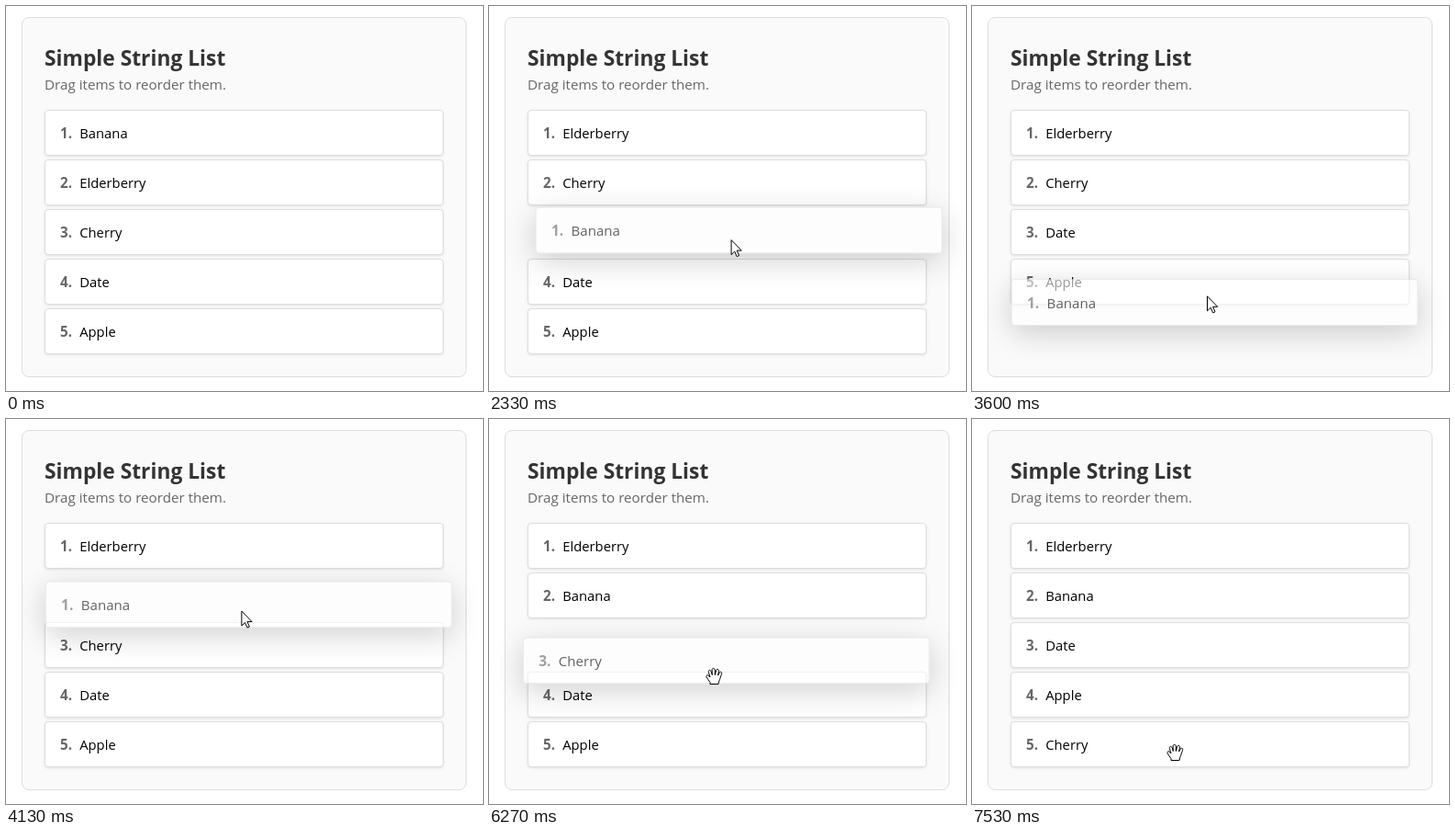
Write an HTML page that moves like this. It is 520 px wide and 419 px high and loops after 8 s.

```html
<!DOCTYPE html>
<html lang="en">
<head>
<meta charset="utf-8">
<title>Simple String List</title>
<style>
  html, body { margin: 0; width: 100%; height: 100%; overflow: hidden; background: #fff; }
  body { position: relative; font: 15.2px/20px "Open Sans", "Noto Sans", sans-serif; }
  .card, .row, h1, p, .row *, .cursor { position: absolute; box-sizing: border-box; margin: 0; white-space: nowrap; }
  .card { left: 17px; top: 12px; width: 485px; height: 392px; background: #fafafa; border: 1px solid #ddd; border-radius: 8px; }
  h1 { left: 42px; top: 42px; font-size: 22.8px; line-height: 30px; font-weight: 700; color: #333; }
  p { left: 42px; top: 75px; color: #666; }
  .row { left: 42px; top: 113px; width: 435px; height: 50px; font-size: 14.8px; line-height: 48px; background: #fff; color: #000;
    border: 1px solid #ddd; border-radius: 4px; box-shadow: 0 1px 3px rgba(0,0,0,.1); }
  .row b { left: 16px; font-size: 15.2px; color: #666; }
  .row span { left: 37.2px; }
  .row.drag { z-index: 1; opacity: .6; box-shadow: 0 8px 32px rgba(0,0,0,.3); }
  .cursor { left: 0; top: 0; z-index: 2; overflow: visible; }
  .cursor path { fill: #fff; stroke: #000; stroke-linejoin: round; }
</style>
</head>
<body>
<div class="card"></div>
<h1>Simple String List</h1>
<p>Drag items to reorder them.</p>
<svg class="cursor" width="1" height="1">
  <path id="arrow" d="M.5 .5V16.5L4.2 13L6.6 18.5L9 17.5L6.6 12H11.7Z"/>
  <path id="hand" d="M-4 8.5V6.5C-5.5 4.5-7 2.5-8 .5C-8.5-1-6.5-2-5.2-.5L-4 1L-5.6-4.5C-6.2-6.8-3.6-7.4-2.9-5.3L-1.7-1.5L-1.9-7C-1.9-9.2 1.2-9.2 1.3-7L1.4-1.5L2.7-6.5C3.3-8.5 6-7.8 5.6-5.7L4.6-1L6.2-3.9C7.2-5.7 9.3-4.7 8.6-2.7C7.4 .5 7 3 5.8 5.2L5 8.5Z"/>
</svg>
<script>
const TICK = 1000 / 15, TICKS = 120, PITCH = 54, TOP = 113, SLIDE = 2;
const names = ['Banana', 'Elderberry', 'Cherry', 'Date', 'Apple'];

// Pointer moves: start tick, end tick, goal x, goal y
const home = [565, 450];
const moves = [
  [0, 4, 32, 163],
  [8, 14, 306, 158], [14, 18, 251, 145],
  [29, 33, 264, 250], [33, 48, 256, 335], [52, 60, 256, 209], [60, 67, 258, 207],
  [76, 80, 253, 160], [81, 87, 246, 260],
  [90, 94, 245, 280], [94, 103, 239, 356],
  [110, 113, 221, 363]
];
const drags = [{ grab: 24, drop: 74 }, { grab: 91, drop: 107 }];

const smooth = p => p * p * (3 - 2 * p);

function pointer(tick) {
  let [x, y] = home;
  for (const [start, end, goalX, goalY] of moves) {
    if (tick <= start) break;
    const f = smooth(Math.min(1, (tick - start) / (end - start)));
    x += (goalX - x) * f;
    y += (goalY - y) * f;
  }
  return { x, y };
}

const slotAt = y => Math.max(0, Math.min(names.length - 1, Math.round(y / PITCH)));

// Play the drags once: the held row takes the slot nearest to it, the others slide aside
function simulate() {
  const order = names.map((_, i) => i);
  const slides = order.map(i => ({ from: i, to: i, since: -SLIDE }));
  const frames = [];
  for (let tick = 0; tick < TICKS; tick++) {
    const now = pointer(tick), late = pointer(tick - 1); // held row trails the pointer
    const drag = drags.find(d => tick >= d.grab && tick < d.drop);
    let held = null;
    if (drag) {
      const origin = pointer(drag.grab - 1);
      if (tick === drag.grab) {
        drag.slot = slotAt(origin.y - TOP - 25);
        drag.item = order[drag.slot];
      }
      held = { item: drag.item, slot: drag.slot, x: late.x - origin.x, y: drag.slot * PITCH + late.y - origin.y };
      order.splice(order.indexOf(held.item), 1);
      order.splice(slotAt(held.y), 0, held.item);
    }
    const rows = slides.map((s, item) => {
      const slot = order.indexOf(item);
      if (slot !== s.to) Object.assign(s, { from: s.to, to: slot, since: tick });
      if (held && held.item === item) return held;
      const left = 1 - Math.min(1, (tick - s.since) / SLIDE);
      return { slot, x: 0, y: PITCH * (slot + (s.from - slot) * left * left) };
    });
    const over = rows.some(r => {
      const dy = late.y - TOP - r.y;
      return r !== held && late.x >= 42 && late.x < 477 && dy >= 0 && dy < 50;
    });
    frames.push({ now, rows, held, over });
  }
  return frames;
}

const cursor = document.querySelector('.cursor');
const arrow = document.getElementById('arrow');
const hand = document.getElementById('hand');
const items = names.map(name => {
  const el = document.createElement('div');
  el.className = 'row';
  el.innerHTML = `<b></b><span>${name}</span>`;
  document.body.insertBefore(el, cursor);
  return el;
});

function draw({ now, rows, held, over }) {
  rows.forEach((row, i) => {
    const el = items[i], lifted = row === held;
    el.classList.toggle('drag', lifted);
    el.firstChild.textContent = `${row.slot + 1}.`;
    el.style.transform = `translate(${row.x}px, ${row.y}px) scale(${lifted ? 1.02 : 1})`;
  });
  cursor.style.transform = `translate(${now.x}px, ${now.y}px)`;
  hand.style.display = over ? '' : 'none';
  arrow.style.display = over ? 'none' : '';
}

const frames = simulate();
const begin = performance.now();
function loop() {
  const t = performance.now() - begin;
  draw(frames[Math.floor((t + 5) / TICK) % TICKS]);
  requestAnimationFrame(loop);
}
loop();
</script>
</body>
</html>
```
